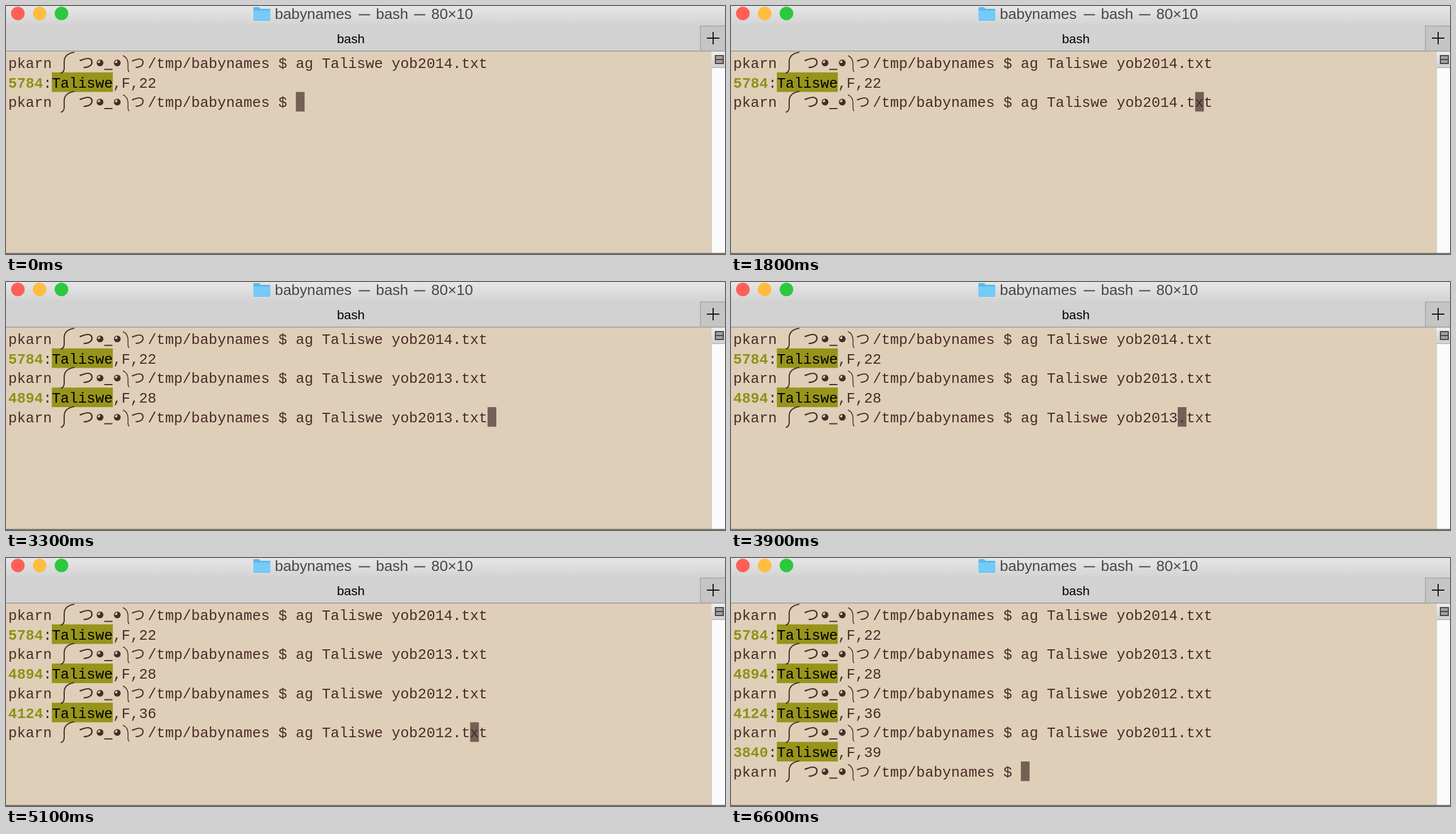
Recreate the animation shown at these times as an HTML page with a canvas. Size 1273 by 440 pixels, loop 6700 ms.

```html
<!DOCTYPE html>
<html lang="en">
<head>
<meta charset="utf-8">
<title>Terminal</title>
<style>
html, body { margin: 0; width: 100%; height: 100%; overflow: hidden; background: #dfcfb8; }
canvas { display: block; }
</style>
</head>
<body>
<canvas id="stage" width="1273" height="440"></canvas>
<script>
const ctx = document.getElementById('stage').getContext('2d');
const LOOP = 6700;
const LEFT = 4, TOP = 83, CELL = 15.43, ROW = 34.75, BASE = 26.8;
const PAPER = '#dfcfb8', INK = '#4b2a29', OLIVE = '#8f9017';
const USER = 'pkarn', NAME = 'Taliswe';
const RESULTS = [['5784', 22], ['4894', 28], ['4124', 36], ['3840', 39]];

// Per command: recall, four steps left, delete, type a digit, enter.
const KEYS = [
  1000, 1700, 1800, 1900, 2000, 2200, 2300, 2500,
  3100, 3400, 3500, 3600, 3700, 4000, 4100, 4300,
  4800, 4900, 5100, 5200, 5300, 5600, 5900, 6200
];

const MONO = '"Liberation Mono", "Noto Sans Mono", monospace';
const KANA = '"Noto Sans CJK JP", sans-serif';
const SANS = '"Liberation Sans", Arial, sans-serif';
ctx.font = `100px ${MONO}`;
const SIZE = CELL * 100 / ctx.measureText('0').width;

const colX = col => LEFT + col * CELL;
const rowY = row => TOP + row * ROW;

function rect(x, y, w, h, color) {
  ctx.fillStyle = color;
  ctx.fillRect(x, y, w, h);
}

function label(text, x, y, font, color) {
  ctx.font = font;
  ctx.fillStyle = color;
  ctx.fillText(text, x, y);
}

function write(text, col, row, color = INK, weight = 400) {
  label(text, colX(col), rowY(row) + BASE, `${weight} ${SIZE}px ${MONO}`, color);
}

function disc(x, y, r, color) {
  ctx.fillStyle = color;
  ctx.beginPath();
  ctx.arc(x, y, r, 0, Math.PI * 2);
  ctx.fill();
}

function stroke(path, width, color) {
  ctx.lineWidth = width;
  ctx.strokeStyle = color;
  ctx.stroke(new Path2D(path));
}

function fade(y0, y1, from, to) {
  const g = ctx.createLinearGradient(0, y0, 0, y1);
  g.addColorStop(0, from);
  g.addColorStop(1, to);
  return g;
}

function eye(x, y) {
  disc(x, y, 6, INK);
  ctx.fillStyle = PAPER;
  ctx.beginPath();
  ctx.moveTo(x, y);
  ctx.arc(x, y, 4.4, Math.PI, Math.PI * 1.5);
  ctx.fill();
}

function face(row) {
  ctx.save();
  ctx.translate(0, rowY(row));
  stroke('M121 -1C108 1 103 8 103 16V27C103 32 101 35 97 36', 2, INK);
  stroke('M207 5C214 8 216 14 216 20V28Q216 32 218 34', 1.5, INK);
  eye(166.5, 18);
  eye(197, 18);
  rect(174, 28.5, 14.5, 2, INK);
  label('つ', 128, BASE + 1, `28px ${KANA}`, INK);
  label('つ', 221, BASE, `500 25px ${KANA}`, INK);
  ctx.restore();
}

function prompt(row, command) {
  write(USER, 0, row);
  face(row);
  write('/tmp/babynames $ ' + command, 16, row);
}

function result(row, [line, count]) {
  write(line, 0, row, OLIVE, 700);
  write(':', 4, row);
  rect(colX(5), rowY(row), 7 * CELL, ROW, '#98941b');
  write(NAME, 5, row, '#000');
  write(',F,' + count, 12, row);
}

const search = year => `ag ${NAME} yob${year}.txt`;

function title(text, x) {
  label(text, x, 23, `26.3px ${SANS}`, '#464646');
}

function chrome() {
  rect(0, 0, 1273, 36, fade(0, 36, '#e6e6e6', '#d2d2d2'));
  rect(0, 36, 1273, 43, '#d2d2d2');
  rect(1229, 35, 44, 44, '#c5c5c5');
  stroke('M1273 35.5H1229.5V79', 1.5, '#a5a5a5');
  rect(0, 79, 1273, 2, '#a9a7a4');
  stroke('M1241 57H1263M1252 46V68', 2, '#111');
  ['#ff5f57', '#ffbd3f', '#2ac940'].forEach((color, i) => disc(21 + i * 38.6, 13.2, 12, color));

  ctx.fillStyle = '#5bb8ea';
  ctx.fill(new Path2D('M438 4Q438 2 440 2H448L451 5H466Q468 5 468 7V24Q468 26 466 26H440Q438 26 438 24Z'));
  rect(438, 8, 30, 17, '#74cbf8');
  title('babynames', 476);
  title('bash', 655);
  title('80×10', 753);
  rect(624.5, 14.5, 20, 2, '#464646');
  rect(722.5, 14.5, 20, 2, '#464646');
  label('bash', 586, 66, `22.6px ${SANS}`, '#000');

  rect(1248, 81, 25, 357, '#fbfbfb');
  rect(1248, 81, 2, 357, '#d3cec7');
  rect(1249, 81, 24, 29, fade(81, 110, '#eeeeee', '#cfcfcf'));
  rect(1249, 109, 24, 1, '#aaa');
  rect(1255, 87, 16, 16, '#4a4545');
  rect(1257, 89, 12, 5, '#a5a09e');
  rect(1257, 96, 12, 5, '#a5a09e');
  rect(0, 438, 1273, 2, '#7d776f');
}

function draw(time) {
  const pressed = KEYS.filter(key => key <= time).length;
  const done = Math.floor(pressed / 8), stage = pressed % 8;

  rect(0, 0, 1273, 440, PAPER);
  for (let i = 0; i <= done; i++) {
    result(2 * i + 1, RESULTS[i]);
    prompt(2 * i, search(2014 - i));
  }

  const row = 2 * done + 2;
  const year = stage < 6 ? 2014 - done : stage < 7 ? '201' : 2013 - done;
  const command = stage ? search(year) : '';
  const back = Math.min(Math.max(stage - 1, 0), 4);
  rect(colX(33 + command.length - back), rowY(row), CELL, ROW, '#755f57');
  prompt(row, command);
  chrome();
}

function tick() {
  draw(performance.now() % LOOP);
  requestAnimationFrame(tick);
}
tick();
</script>
</body>
</html>
```
